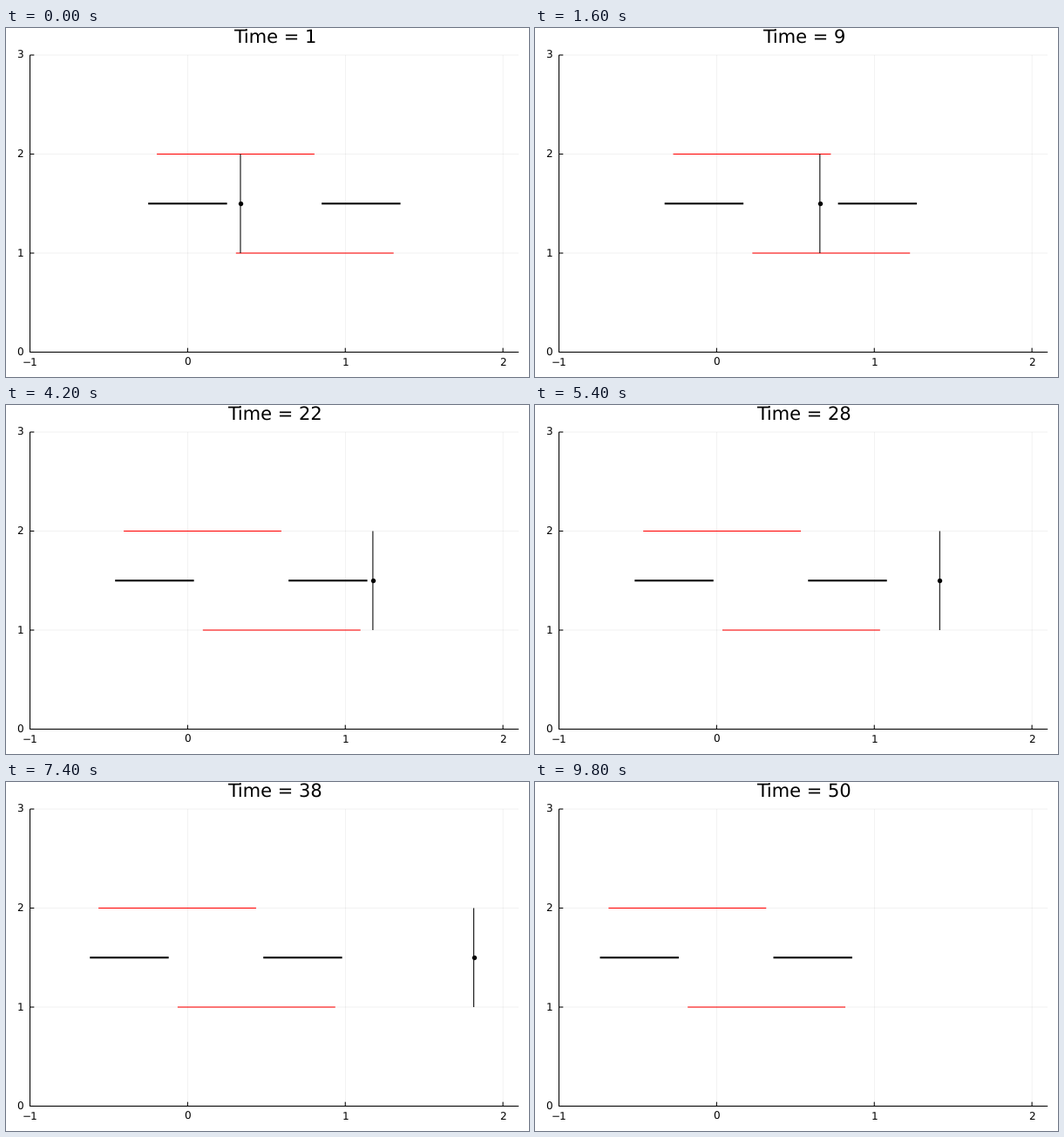
These frames come from a looping animation (600x400 px, 10 s). A matplotlib script:

```python
import matplotlib.pyplot as plt
from matplotlib.animation import FuncAnimation

W, H, DPI = 600, 400, 100
LEFT, RIGHT, TOP, BOTTOM = 27.5, 588.2, 31.0, 371.5
SX, SY = (RIGHT - LEFT) / 3.1, (BOTTOM - TOP) / 3  # pixels per unit
STEPS, INTERVAL = 50, 200
PX = 72 / DPI  # one pixel in points
XS, YS = [-1, 0, 1, 2], [0, 1, 2, 3]

plt.rcParams.update({"font.family": "DejaVu Sans", "text.hinting": "none",
                     "text.hinting_factor": 1, "path.snap": False})
fig = plt.figure(figsize=(W / DPI, H / DPI), dpi=DPI, facecolor="white")
ax = fig.add_axes([LEFT / W, 1 - BOTTOM / H,
                   (RIGHT - LEFT) / W, (BOTTOM - TOP) / H])
ax.set_xlim(-1, 2.1)
ax.set_ylim(0, 3)
ax.axis("off")

# Grid, axes and inward ticks
grid = dict(color="black", alpha=0.1, linewidth=0.5 * PX, clip_on=False)
axis = dict(color="black", linewidth=1.05 * PX, clip_on=False)
ax.vlines(XS[1:], 0, 3, **grid)
ax.hlines(YS[1:], -1, 2.1, **grid)
ax.vlines(-1, 0, 3, **axis)
ax.hlines(0, -1, 2.1, **axis)
ax.vlines(XS, 0, 4.8 / SY, **axis)
ax.hlines(YS, -1, -1 + 4.8 / SX, **axis)


def label(x, y, text, size, ha="center"):
    """Text with its baseline at a pixel position, y counted downwards."""
    return fig.text(x / W, 1 - y / H, text, fontsize=size * PX,
                    ha=ha, va="baseline")


for v in XS:
    label(LEFT + (v + 1) * SX, 387.1, str(v).replace("-", "\u2212"), 11.9)
for v in YS:
    label(19.9, BOTTOM - v * SY + 3.9, str(v), 11.9, "right")
title = label(308.6, 18.2, "", 20.8)


def line(color, width):
    return ax.plot([], [], color=color, linewidth=width * PX,
                   solid_capstyle="butt", zorder=3)[0]


# Drifting bars: (line, first left end, length, height)
BARS = [
    (line("red", 1.05), -0.1955, 1.0, 2),
    (line("red", 1.05), 0.3065, 1.0, 1),
    (line("black", 2.1), -0.25, 0.5, 1.5),
    (line("black", 2.1), 0.85, 0.5, 1.5),
]
rod = line("black", 1.05)
dot = ax.plot([], [], "o", color="black", markersize=5.4 * PX,
              markeredgewidth=0, zorder=4)[0]


def update(i):
    for bar, start, length, y in BARS:
        x = start - 0.01 * i
        bar.set_data([x, x + length], [y, y])
    x = 0.335 + 0.04 * i
    rod.set_data([x, x], [1, 2])
    dot.set_data([x], [1.5])
    title.set_text(f"Time = {i + 1}")
    return [bar[0] for bar in BARS] + [rod, dot, title]


anim = FuncAnimation(fig, update, frames=STEPS, interval=INTERVAL,
                     init_func=lambda: update(0), repeat=True,
                     repeat_delay=0, blit=False)
plt.show()
```
